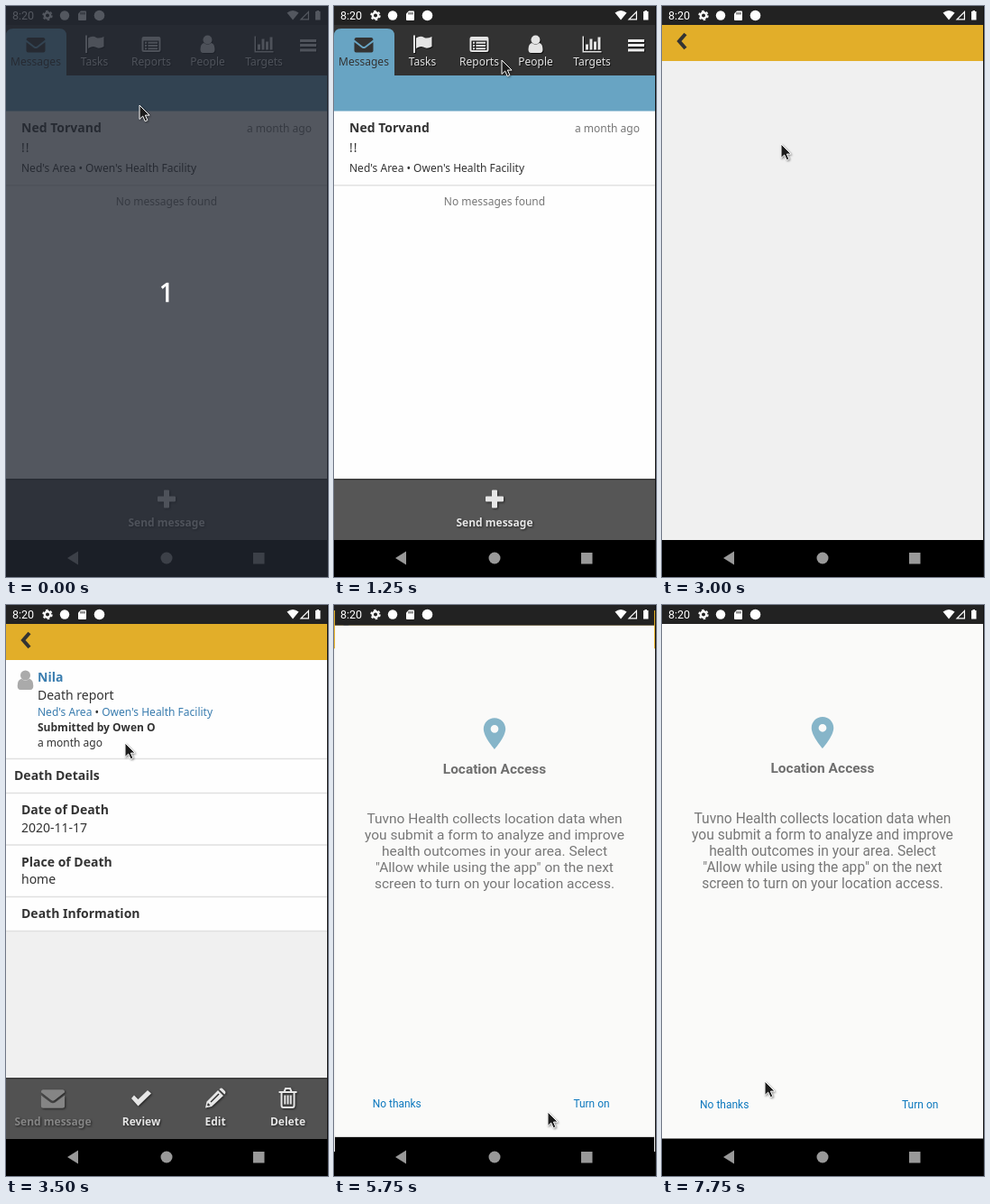
Recreate the animation shown at these times as an HTML page. Size 357x633 px, loop 8 s.

```html
<!DOCTYPE html>
<html lang="en">
<head>
<meta charset="utf-8">
<title>Report walkthrough</title>
<style>
html, body { margin: 0; width: 100%; height: 100%; overflow: hidden; background: #000; }
svg { display: block; }
#stage { width: 357px; height: 633px; }
text { font: 12px "Noto Sans", sans-serif; fill: #333; white-space: pre; }
.b { font-weight: 700; }
.l { font-size: 14px; }
.m { text-anchor: middle; }
.e { text-anchor: end; }
.dim { fill: #777; }
.link { fill: #3a7daf; }
.r { font-family: Roboto, sans-serif; }
.go { fill: #0c78be; }
.tabs .off { filter: drop-shadow(1px 1px 0 #111); }
.tabs .off text { fill: #e4e4e4; }
.off { color: #e4e4e4; }
.on { color: #333; }
.acts { color: #e6e6e6; filter: drop-shadow(1px 1px 1px #0009); }
.acts text { fill: currentColor; font-weight: 700; text-anchor: middle; }
.f { fill: currentColor; }
.s { fill: none; stroke: currentColor; stroke-width: 2; }

#veil, #messages, #reports, #page, #detail, #location, #cursor {
  animation: 8s step-end infinite;
}
#veil { animation-name: veil; }
#messages { animation-name: messages; }
#reports { animation-name: reports; }
#page { animation-name: page; transform-origin: 178px 316px; }
#detail { animation-name: detail; }
#location { animation-name: location; transform-origin: 178px 316px; }
#cursor { animation-name: cursor; }
@keyframes veil { 0% { visibility: visible } 6.25%, 100% { visibility: hidden } }
@keyframes messages { 0% { visibility: visible } 21.875%, 100% { visibility: hidden } }
@keyframes reports { 0% { visibility: hidden } 21.875% { visibility: visible } 37.5%, 100% { visibility: hidden } }
@keyframes page {
  0% { opacity: 0; transform: none }
  37.5% { opacity: 1; transform: none }
  68.75% { opacity: 1; transform: scale(1.005) }
  71.875% { opacity: 1; transform: scale(1.05) }
  75%, 100% { opacity: 0; transform: none }
}
@keyframes detail { 0% { visibility: hidden } 43.75% { visibility: visible } 68.75%, 100% { visibility: hidden } }
@keyframes location {
  0% { visibility: hidden; transform: none }
  71.875% { visibility: visible; transform: scale(.994) }
  75%, 100% { visibility: visible; transform: none }
}
@keyframes cursor {
  0% { transform: translate(148px, 110px) }
  9.375% { transform: translate(159px, 87px) }
  12.5% { transform: translate(163px, 64px) }
  15.625% { transform: translate(186px, 60px) }
  25% { transform: translate(152px, 88px) }
  28.125% { transform: translate(132px, 149px) }
  31.25% { transform: translate(132px, 153px) }
  46.875% { transform: translate(131px, 184px) }
  50% { transform: translate(120px, 315px) }
  53.125% { transform: translate(129px, 400px) }
  56.25% { transform: translate(192px, 514px) }
  59.375% { transform: translate(232px, 558px) }
  62.5% { transform: translate(237px, 562px) }
  84.375% { transform: translate(203px, 552px) }
  87.5% { transform: translate(185px, 542px) }
  90.625% { transform: translate(146px, 528px) }
  93.75% { transform: translate(123px, 528px) }
  96.875%, 100% { transform: translate(114px, 528px) }
}
</style>
</head>
<body>
<svg id="stage" viewBox="0 0 357 633">
  <defs>
    <g id="mail"><path class="f" d="M-10.500-5Q-10.500-7.500-8.500-7.500H8.500Q10.500-7.500 10.500-5L1.500 2Q0 3-1.500 2ZM-10.500-2.500L-2 4Q0 5.200 2 4L10.500-2.500V7Q10.500 9 8.500 9H-8.500Q-10.500 9-10.500 7Z"/></g>
    <g id="flag"><path class="f" d="M-10-10H-8V9.500H-10ZM-7-7Q-2-10 2-7.500Q5-6 10.500-8.500V2.500Q5 5.500 1 3Q-2 1.500-7 4.500Z"/></g>
    <g id="list">
      <rect class="s" x="-9.500" y="-7.500" width="19" height="15" rx="1.500"/>
      <path class="f" d="M-9.500-8H9.500V-4H-9.500Z"/>
      <path class="s" stroke-dasharray="2 1.500 10.500" d="M-7-1.800H7M-7 1.500H7M-7 4.800H7"/>
    </g>
    <g id="user"><circle class="f" cy="-5" r="5"/><path class="f" d="M-4-1.500Q0 2 4-1.500Q8-.500 8 5.500Q8 9.500 5 9.500H-5Q-8 9.500-8 5.500Q-8-.500-4-1.500Z"/></g>
    <g id="chart"><path class="f" d="M-10.500-9H-9V7.500H10.500V9H-10.500ZM-7 0H-4V6H-7ZM-2.500-6H.5V6H-2.500ZM2-3H5V6H2ZM6.500-8H9.500V6H6.500Z"/></g>
    <g id="plus"><path class="f" d="M-2-10H2Q3-10 3-9V-3H9Q10-3 10-2V2Q10 3 9 3H3V9Q3 10 2 10H-2Q-3 10-3 9V3H-9Q-10 3-10 2V-2Q-10-3-9-3H-3V-9Q-3-10-2-10Z"/></g>
    <g id="tick"><path class="f" d="M-11 .5L-8-3L-3.500 1.500L7-8.500L11-5L-3.500 9Z"/></g>
    <g id="done"><circle class="f" r="11"/><path fill="none" stroke="#555" stroke-width="3.500" d="M-6 0L-2 4L6-4"/></g>
    <g id="pencil"><path class="f" fill-rule="evenodd" d="M-11 11L-9.500 4L3-8.500L9-2.500L-4 9.500ZM-8 5.500L-9 8L-8 9L-5.500 8ZM-5.500 4L-4.500 5L4.500-4L3.500-5ZM4.500-9.500Q6.500-12 8.500-10L10.500-8Q12.500-6 10.300-4Z"/></g>
    <g id="bin"><path class="s" d="M-7-6.500V8Q-7 10.500-5 10.500H5Q7 10.500 7 8V-6.500M-10-6.500H10M-4-7L-2.500-10.500H2.500L4-7M-3.200-3V7M0-3V7M3.200-3V7"/></g>
    <g id="down"><path class="s" style="stroke-width:3" d="M-5.500-3L0 2.500L5.500-3"/></g>
    <g id="hospital">
      <path class="s" style="stroke-width:1.500" d="M-7 9V-4H-3.500V-9H3.500V-4H7V9ZM-1.500 9V5H1.500V9M0-7.500V-2.500M-2.500-5H2.500"/>
      <path class="s" stroke-dasharray="2 1.800" d="M-4.700 0H5M-4.700 3.500H5"/>
    </g>
    <g id="calendar">
      <path class="s" style="stroke-width:1.100" d="M-8.500-6.500H8.500V9H-8.500ZM-8.500 1.500H8.500M-8.500 5.200H8.500M-4.300-2V9M0-2V9M4.300-2V9"/>
      <path class="f" d="M-9-7H9V-2.500H-9ZM-6-9.500H-3.500V-5H-6ZM3.500-9.500H6V-5H3.500Z"/>
    </g>
    <g id="ring"><circle class="s" r="7.500" style="stroke-width:2.500"/></g>
    <g id="search"><circle class="s" cx="-1.500" cy="-1.500" r="5.800" style="stroke-width:2.800"/><path class="s" style="stroke-width:3.500" d="M3 3L8 8"/></g>
    <g id="pregnant" color="#e36f61"><circle class="f" cx="0" cy="-11" r="2.800"/><path class="f" d="M-3-7.500H2Q4-4 4-2Q7 0 4 3.500L2.500 5L3 13H1L-.500 5.500L-3 13H-5L-3 2L-6 0Q-6-5-3-7.500Z"/></g>
    <g id="mother" color="#e36f61"><circle class="f" cx="1" cy="-9.500" r="3.600"/><path class="f" d="M-3-5H4Q8-4 8 2L7 6Q8 12 3 13H-4Q-9 11-7 7L-5 4Q-6-4-3-5Z"/><circle cx="-3.500" cy="1" r="2.600" class="f" stroke="#fff"/><path d="M-4 7Q2 8 4 2" fill="none" stroke="#fff"/></g>
    <g id="baby" color="#79aab3"><circle class="f" cy="-8.500" r="4.800"/><path class="f" d="M-9-4L-7.500-5L-3-2H3L7.500-5L9-4L5 2V4H-5V2ZM-5 5H5L7 10L4 13L1 9H-1L-4 13L-7 10Z"/></g>
    <path id="pin" d="M12 2C8.130 2 5 5.130 5 9c0 5.250 7 13 7 13s7-7.750 7-13c0-3.870-3.130-7-7-7zm0 9.500a2.500 2.500 0 1 1 0-5a2.500 2.500 0 0 1 0 5z"/>
  </defs>

  <rect width="357" height="633" fill="#000"/>
  <rect width="357" height="21" fill="#222"/>

  <g id="messages">
    <rect y="21" width="357" height="571" fill="#fefefe"/>
    <g id="tabsA" class="tabs"></g>
    <rect y="77" width="357" height="39.500" fill="#68a4c3"/>
    <text class="b l" x="17" y="140">Ned Torvand</text>
    <text class="e dim" x="339" y="140">a month ago</text>
    <text class="l" x="17" y="162" letter-spacing="1">!!</text>
    <text x="17" y="184">Ned's Area • Owen's Health Facility</text>
    <rect y="198" width="357" height="1.500" fill="#e2e2e2"/>
    <text class="m dim" x="178" y="221">No messages found</text>
    <g id="actsA"></g>
  </g>

  <g id="reports">
    <rect y="21" width="357" height="571" fill="#fefefe"/>
    <g id="rows"></g>
    <g id="tabsB" class="tabs"></g>
    <g id="filters" class="on"></g>
    <g id="actsB"></g>
    <rect y="592" width="357" height="41" fill="#000"/>
  </g>

  <g id="page">
    <rect y="21" width="357" height="571" fill="#f0f0f0"/>
    <rect y="21" width="357" height="40" fill="#e2ae29"/>
    <path d="M26 31L19 39L26 47" fill="none" stroke="#333" stroke-width="4"/>
    <g id="detail">
      <rect y="61" width="357" height="301" fill="#fefefe"/>
      <path d="M0 170.500H357M0 208.500H357M0 266H357M0 323.500H357M0 361.500H357" stroke="#e0e0e0" stroke-width="1.500"/>
      <use href="#user" transform="translate(21.500 83.500) scale(1.100)" color="#aaa"/>
      <text class="b l link" x="35" y="85">Nila</text>
      <text class="l" x="35" y="105">Death report</text>
      <text x="35" y="123"><tspan class="link">Ned's Area</tspan> • <tspan class="link">Owen's Health Facility</tspan></text>
      <text class="b" x="35" y="140">Submitted by Owen O</text>
      <text x="35" y="157">a month ago</text>
      <text class="b l" x="9" y="194">Death Details</text>
      <text class="b l" x="17" y="232">Date of Death</text>
      <text class="l" x="17" y="252">2020-11-17</text>
      <text class="b l" x="17" y="290">Place of Death</text>
      <text class="l" x="17" y="309">home</text>
      <text class="b l" x="17" y="347">Death Information</text>
      <g id="actsC"></g>
    </g>
  </g>

  <g id="location">
    <rect y="590" width="356" height="70" fill="#000"/>
    <rect y="-10" width="356" height="31" fill="#222"/>
    <rect y="21" width="356" height="570.500" fill="#fafaf9"/>
    <use href="#pin" fill="#86b5c9" transform="translate(157 120.500) scale(1.750)"/>
    <g id="notice"></g>
    <text class="r go" x="42" y="558">No thanks</text>
    <text class="r go" x="266" y="558">Turn on</text>
  </g>

  <rect x="356" width="1" height="633" fill="#111"/>
  <g id="system" fill="#fff">
    <text class="r" style="fill:#fff;font-size:12.500px" x="7" y="15">8:20</text>
    <circle cx="46" cy="10.500" r="3.200" fill="none" stroke="#fff" stroke-width="2.400"/>
    <circle cx="46" cy="10.500" r="4.900" fill="none" stroke="#fff" stroke-width="1.600" stroke-dasharray="2.600 2.530"/>
    <circle cx="65" cy="10.500" r="5.200"/>
    <path d="M83 5.500H88Q89 5.500 89 6.500V15Q89 16 88 16H81Q80 16 80 15V8.500Z"/>
    <path d="M83 7V9.500M85 7V9.500M87 7V9.500" stroke="#222"/>
    <circle cx="103.500" cy="10.500" r="5.800"/>
    <path d="M311.500 7.500Q318 2.500 324.500 7.500L318 15.500Z"/>
    <path d="M336 5V15.500H325.500ZM334.800 8V14.300H328.500Z" fill-rule="evenodd"/>
    <path d="M343 6H344.500V5H347V6H348.500V15.500H343Z"/>
    <g fill="#999"><path d="M68 612L80 604.500V619.500Z"/><circle cx="178" cy="612" r="6.500"/><rect x="274" y="606" width="12.500" height="12.500"/></g>
  </g>

  <g id="veil">
    <rect width="357" height="633" fill="#232832" fill-opacity=".78"/>
    <text class="m" style="font-size:29px;fill:#fff;stroke:#fff;stroke-width:.7" x="178" y="328">1</text>
  </g>
  <g id="cursor" style="filter:drop-shadow(1px 1px 1px #0007)">
    <path d="M0 0V15.500L3.700 12.100L6.200 17.800L8.900 16.700L6.400 11.100H11.100Z" fill="#1c1c1c" stroke="#fff"/>
  </g>
</svg>
<script>
const put = (id, html) => document.getElementById(id).innerHTML = html;
const icon = (name, x, y, color = "", size = 1) =>
  `<use href="#${name}" transform="translate(${x} ${y}) scale(${size})"${color && ` color="${color}"`}/>`;

const tabs = [["Messages", "mail", 33], ["Tasks", "flag", 98], ["Reports", "list", 161],
  ["People", "user", 223.5], ["Targets", "chart", 286]];

function header(active, left, width, color) {
  const items = tabs.map(([label, name, x], i) =>
    `<g class="${i === active ? "on" : "off"}">${icon(name, x, 42.5)}<text class="m" x="${x}" y="66">${label}</text></g>`);
  return `<rect y="21" width="357" height="56" fill="#323232"/>
    <path d="M${left} 77V33q0-8 8-8h${width - 16}q8 0 8 8V77Z" fill="${color}"/>${items.join("")}
    <path class="off" d="M326 38.500h18M326 43.500h18M326 49h18" stroke="#eee" stroke-width="3"/>`;
}

// Each action is [label, icon, centre x, optional colour, optional icon size].
function actions(items) {
  return `<rect y="524.500" width="357" height="67.500" fill-opacity=".66"/>
    <rect y="524" width="357" height="1.500" fill="#3a3a3a"/><g class="acts">` +
    items.map(([label, name, x, color = "", size = 1]) =>
      `<g${color && ` color="${color}"`}>${icon(name, x, 546.5, "", size)}<text x="${x}" y="577">${label}</text></g>`).join("") + "</g>";
}

const place = "Owen's Health Facility";
const rows = [
  ["Nila", "Death report", "Ned's Area • " + place, "user"],
  ["Eva E", "Pregnancy registration", "Kevin's Area • " + place, "pregnant"],
  ["Daniel", "Delivery", "Ned's Area • " + place, "mother"],
  ["Daniel", "Postnatal danger sign follow-up - baby", place, "baby"],
  ["Ned Torvand", "Delivery", "Ned's Area • " + place, "mother"],
  ["Ned Torvand", "Pregnancy registration", "Ned's Area • " + place, "pregnant"]
];

put("rows", rows.map(([name, kind, where, pic], i) =>
  `<g transform="translate(0 ${(117 + i * 82.65).toFixed(1)})">
    <rect y="-1.500" width="357" height="1.500" fill="#e2e2e2"/>
    ${pic === "user" ? icon(pic, 21.5, 26, "#aaa", 1.1) : icon(pic, 21.5, 26)}
    <text class="b l" x="39" y="23">${name}</text><text class="e dim" x="339" y="23">a month ago</text>
    <text class="l" x="39" y="45">${kind}</text><text x="39" y="67">${where}</text>
  </g>`).join("") +
  `<circle cx="332.500" cy="239" r="6.300" fill="#cc2433"/>
   <path d="M330.200 236.700l4.600 4.600m0-4.600l-4.600 4.600" stroke="#fff" stroke-width="1.800"/>`);

put("filters", `<rect y="77" width="357" height="39.500" fill="#e2ae29"/>` +
  ["list", "hospital", "calendar", "ring", "search"].map((name, i) => {
    const x = 2 + i * 64.3;
    return `<rect x="${x}" y="80" width="63.300" height="34.500" fill="#eed788"/>` +
      icon(name, x + 12.8, 98) + icon("down", x + 52.2, 99);
  }).join("") +
  `<path class="s" d="M341.500 94A5 5 0 1 1 342 100"/><path class="f" d="M339 90.500V97H345.500Z"/>`);

put("tabsA", header(0, 0, 67, "#68a4c3"));
put("tabsB", header(2, 130, 63, "#e2ae29"));
put("actsA", actions([["Send message", "plus", 178]]));
put("actsB", actions([["Submit report", "plus", 126], ["Select", "done", 230]]));
put("actsC", actions([["Send message", "mail", 52, "#858585", 1.25], ["Review", "tick", 150],
  ["Edit", "pencil", 232], ["Delete", "bin", 312.5]]));

const notice = ["Tuvno Health collects location data when", "you submit a form to analyze and improve",
  "health outcomes in your area. Select", "\"Allow while using the app\" on the next",
  "screen to turn on your location access."];
put("notice", `<text class="r b m" style="fill:#6e6e6e;font-size:15.500px" x="178" y="186">Location Access</text>` +
  notice.map((line, i) =>
    `<text class="r m dim" style="font-size:15.600px" x="178" y="${241.5 + i * 18}">${line}</text>`).join(""));
</script>
</body>
</html>
```
